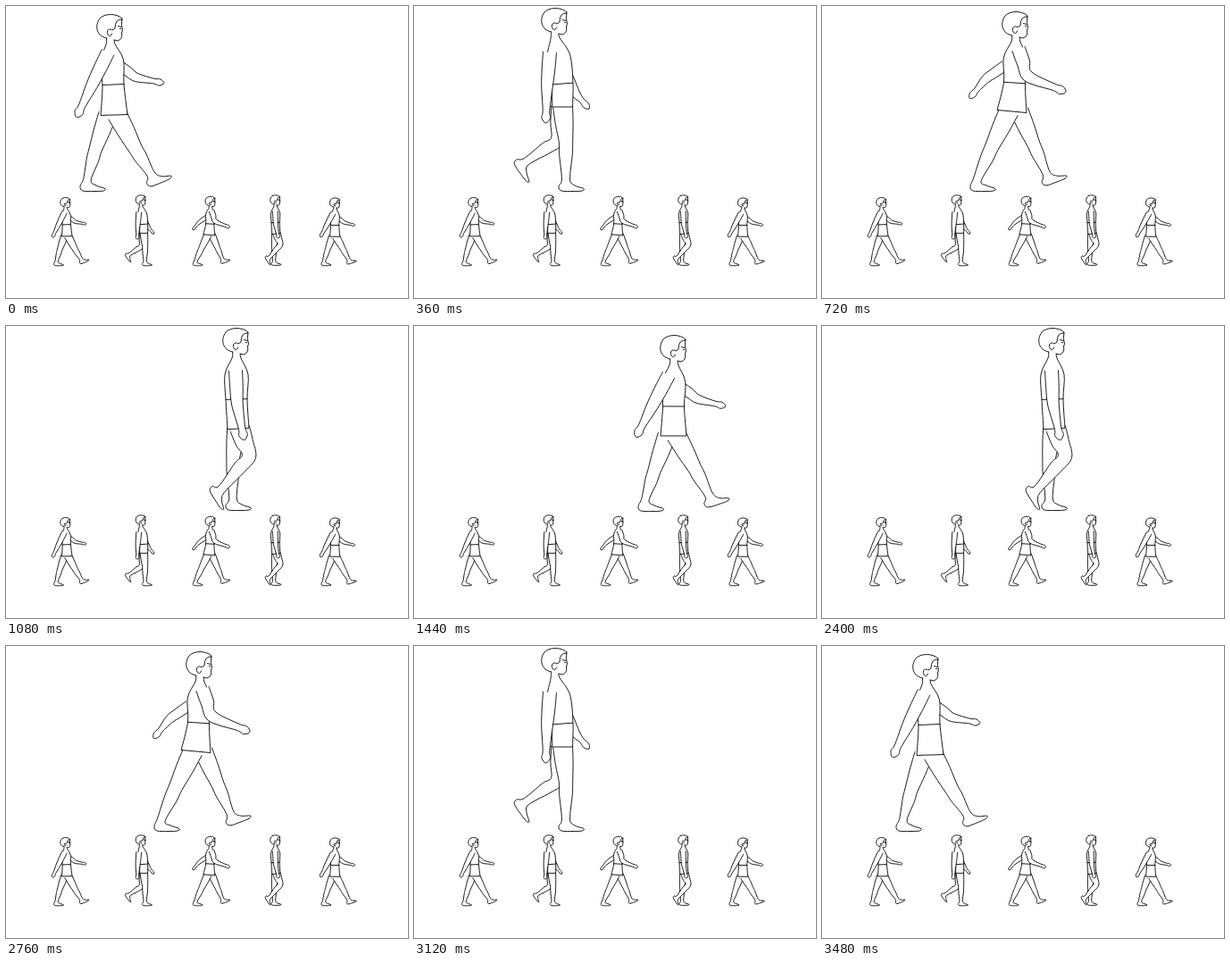
An HTML page for the animation above (3840 ms loop, 450 by 327 pixels).

```html
<!DOCTYPE html>
<html lang="en">
<head>
<meta charset="utf-8">
<title>Walk cycle</title>
<style>
html, body { margin: 0; width: 100%; height: 100%; overflow: hidden; background: #fff; }
svg { display: block; width: 450px; height: 327px; }
path { fill: #fff; stroke: #000; stroke-width: .9; stroke-linejoin: round; stroke-linecap: round; vector-effect: non-scaling-stroke; }
.line { fill: none; }
.big { opacity: 0; animation: 3840ms step-end infinite; }
@keyframes a { 0%, 90.625%, 100% { opacity: 1 } 9.375% { opacity: 0 } }
@keyframes b { 0%, 18.75%, 90.625%, 100% { opacity: 0 } 9.375%, 81.25% { opacity: 1 } }
@keyframes c { 0%, 28.125%, 81.25%, 100% { opacity: 0 } 18.75%, 71.875% { opacity: 1 } }
@keyframes d { 0%, 37.5%, 71.875%, 100% { opacity: 0 } 28.125%, 62.5% { opacity: 1 } }
@keyframes e { 0%, 62.5%, 100% { opacity: 0 } 37.5% { opacity: 1 } }
</style>
</head>
<body>
<svg id="stage" viewBox="0 0 450 327"></svg>
<script>
// Joints in stage pixels; "foot" is the angle of the sole in degrees.
const poses = {
  a: {
    head: [0, 0], waist: [120, 88], hem: [121, 122], hemHalf: 15, miniX: 21.6,
    nearArm: { shoulder: [114, 52], elbow: [96, 89], wrist: [85, 112] },
    farArm: { elbow: [146, 80], wrist: [165, 84] },
    nearLeg: { knee: [145, 160], ankle: [162, 188], foot: -22 },
    farLeg: { knee: [100, 161], ankle: [91, 194], foot: 0 }
  },
  b: {
    head: [41, -7], waist: [166, 87], hem: [166, 113], hemHalf: 11.5, miniX: 90.2,
    nearArm: { shoulder: [152, 52], elbow: [149, 90], wrist: [148, 117] },
    farArm: { elbow: [181, 98], wrist: [188, 106] },
    nearLeg: { knee: [170, 152], ankle: [170, 194], foot: 0 },
    farLeg: { knee: [160, 151], ankle: [126, 174], foot: 55 }
  },
  c: {
    head: [100, -3], waist: [215.5, 86], hem: [212.5, 118], hemHalf: 16.5, miniX: 145.4,
    nearArm: { shoulder: [220, 48], elbow: [231, 79], wrist: [260, 91] },
    farArm: { elbow: [183, 82], wrist: [173, 94] },
    nearLeg: { knee: [190, 158], ankle: [174, 194], foot: 0 },
    farLeg: { knee: [237, 155], ankle: [251, 187], foot: -20 }
  },
  d: {
    head: [141, -7], waist: [258, 82], hem: [260, 115], hemHalf: 12, miniX: 202.3,
    nearArm: { shoulder: [257, 50], elbow: [259, 88], wrist: [264, 114] },
    farArm: null,
    nearLeg: { knee: [272, 146], ankle: [242, 182], foot: 58 },
    farLeg: { knee: [254, 150], ankle: [254, 193], foot: 0 }
  },
  e: {
    head: [174, 1], waist: [290.5, 90], hem: [290.5, 123], hemHalf: 14.5, miniX: 256.3,
    nearArm: { shoulder: [285, 55], elbow: [266, 91], wrist: [255, 112] },
    farArm: { elbow: [318, 82], wrist: [337, 87] },
    nearLeg: { knee: [314, 159], ankle: [330, 189], foot: -18 },
    farLeg: { knee: [269, 162], ankle: [259, 194], foot: 0 }
  }
};
const FOOT = [[-8, 8], [-5, 13], [8, 13.5], [18, 13], [20, 10.5], [10, 7]];
const MINI = 0.385;

const add = (p, q) => [p[0] + q[0], p[1] + q[1]];
const lerp = (p, q, t) => p.map((v, k) => v + (q[k] - v) * t);
const path = (d, cls = '') => `<path class="${cls}" d="${d}"/>`;

function turn([x, y], deg) {
  const r = deg * Math.PI / 180, c = Math.cos(r), s = Math.sin(r);
  return [x * c - y * s, x * s + y * c];
}

// Smooth curve through the points (Catmull-Rom as cubic Beziers).
function curve(pts, start = 'M') {
  const at = i => pts[Math.max(0, Math.min(pts.length - 1, i))];
  let d = start + pts[0];
  for (let i = 0; i < pts.length - 1; i++) {
    const [p, q, r, s] = [at(i - 1), at(i), at(i + 1), at(i + 2)];
    const c1 = add(q, [(r[0] - p[0]) / 6, (r[1] - p[1]) / 6]);
    const c2 = add(r, [(q[0] - s[0]) / 6, (q[1] - s[1]) / 6]);
    d += `C${c1} ${c2} ${r}`;
  }
  return d;
}

// Both edges of a part with the given half-widths along its centre line.
function edges(centre, half) {
  const side = sign => centre.map((p, i) => {
    const from = centre[Math.max(0, i - 1)];
    const to = centre[Math.min(centre.length - 1, i + 1)];
    const dx = to[0] - from[0], dy = to[1] - from[1];
    const k = sign * half[i] / Math.hypot(dx, dy);
    return add(p, [-dy * k, dx * k]);
  });
  return { back: side(1), front: side(-1).reverse() };
}

function arm({ shoulder, elbow, wrist }, size) {
  const dir = lerp([0, 0], [wrist[0] - elbow[0], wrist[1] - elbow[1]],
    14 * Math.sqrt(size) / Math.hypot(wrist[0] - elbow[0], wrist[1] - elbow[1]));
  const palm = add(wrist, lerp([0, 0], dir, 0.6));
  const { back, front } = edges(
    [shoulder, lerp(shoulder, elbow, 0.5), elbow, wrist, palm],
    [7.5, 7.3, 6.3, 3.8, 4.8].map(w => w * size));
  return path(curve([...back, add(wrist, dir), ...front]));
}

function leg({ knee, ankle, foot }, hem, spread, size) {
  const hip = add(hem, [(knee[0] - hem[0]) * spread, 0]);
  const { back, front } = edges(
    [hip, lerp(hip, knee, 0.5), knee, lerp(knee, ankle, 0.35), ankle],
    [11, 9.8, 7.7, 7.3, 4.6].map(w => w * size));
  const sole = FOOT.map(p => add(ankle, turn(p, foot)));
  return path(curve([...back, ...sole, ...front]));
}

function body(neck, chest, { waist, hem, hemHalf }) {
  const { back, front } = edges(
    [neck, add(neck, [0, 7]), chest, waist, hem],
    [4.5, 5, 13, 12, hemHalf]);
  return path(curve(back) + curve(front, 'L')) +
    path(`M${back[3]}L${front[1]}`, 'line');
}

function head([x, y]) {
  return `<g transform="translate(${x} ${y})">` +
    path('M113 36C101 34 99 22 105 14C110 8 124 8 130 14Q128.5 21 130.5 27L129.5 30Q131 37 125 39L121 38') +
    path('M130 15Q122 14 122 25L119 27C115 24 112 28 114 32Q117 36 118.5 31', 'line') +
    path('M125.5 22.5L129 23.5M127.5 25.5L128.5 25.5', 'line') + '</g>';
}

function figure(pose) {
  const neck = add([117, 36], pose.head);
  const chest = lerp(neck, pose.waist, 0.48);
  const far = pose.farArm;
  return (far ? arm({ shoulder: lerp(chest, far.elbow, 0.35), ...far }, 0.75) : '') +
    leg(pose.farLeg, pose.hem, 0.35, 0.93) +
    leg(pose.nearLeg, pose.hem, 0.15, 1) +
    body(neck, chest, pose) +
    arm(pose.nearArm, 1) +
    head(pose.head);
}

document.getElementById('stage').innerHTML = Object.entries(poses).map(([name, pose]) => {
  const shape = figure(pose);
  return `<g class="big" style="animation-name:${name}">${shape}</g>` +
    `<g transform="translate(${pose.miniX} 210.9) scale(${MINI})">${shape}</g>`;
}).join('');
</script>
</body>
</html>
```
